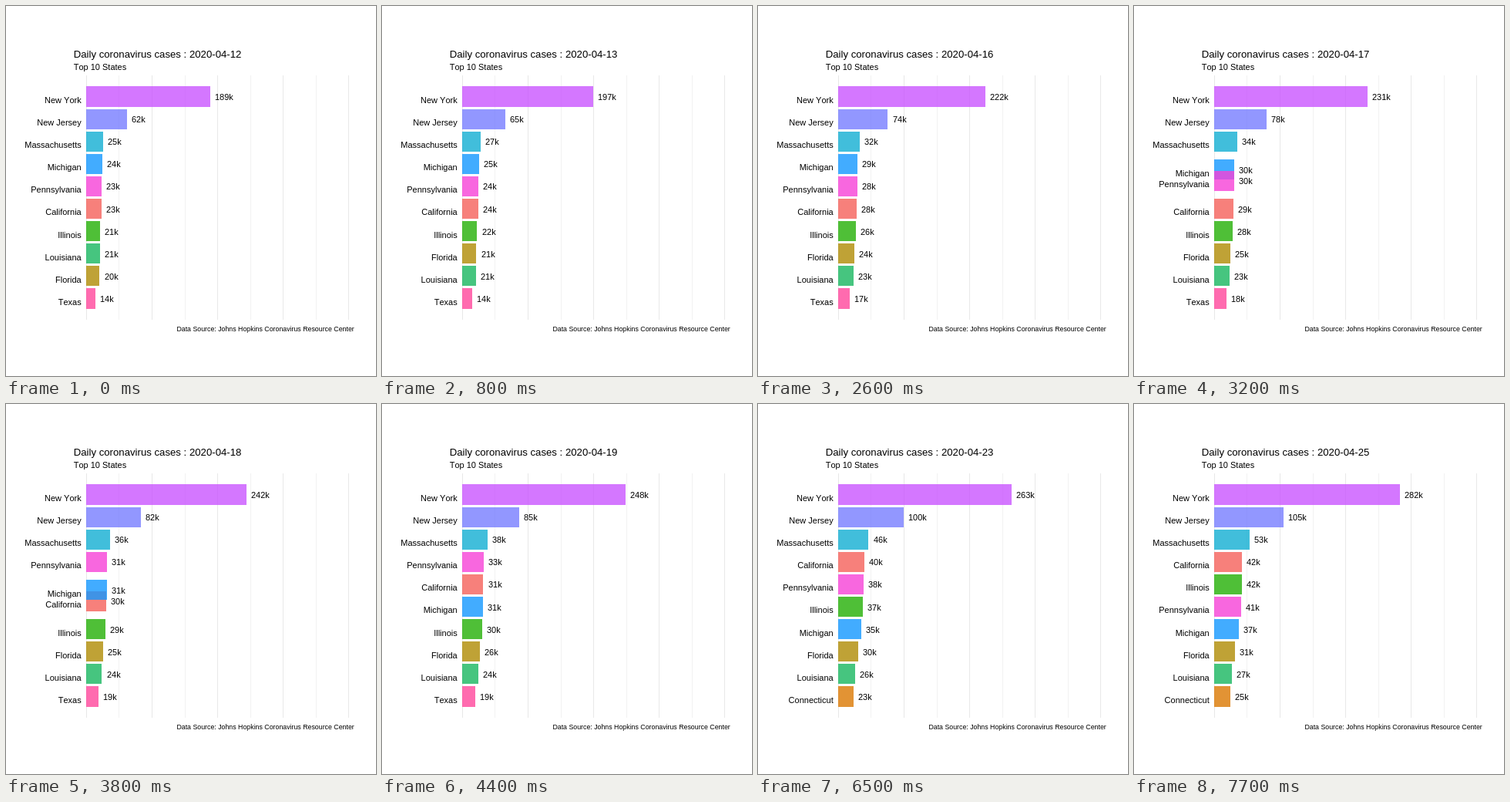
These frames come from a looping animation (480x480 px, 8 s). An HTML page with a canvas:

```html
<!DOCTYPE html>
<html lang="en">
<head>
<meta charset="utf-8">
<title>Daily coronavirus cases</title>
<style>
  html, body { margin: 0; width: 100%; height: 100%; overflow: hidden; background: #fff; }
  canvas { display: block; width: 480px; height: 480px; }
</style>
</head>
<body>
<canvas id="stage" width="480" height="480"></canvas>
<script>
const ctx = document.getElementById('stage').getContext('2d');
const LOOP = 8000, HOLD = 200, DAY = 600, STEP = 100;
const X0 = 104.3, SCALE = 0.8515;                // px per thousand cases
const TOP = 104.42, PITCH = 29.1, BAR = 26.2;
const FIRST_DATE = 12, ROWS = 10;

// Turning points as day: thousands of cases; growth is linear in between.
const states = [
  { name: 'California', color: '#f6615a', keys: { 0: 22.85, 7: 31.43, 11: 39.56, 13: 42.37 } },
  { name: 'Connecticut', color: '#db7902', keys: { 0: 12, 8: 20.15, 9: 20.3, 10: 22.4, 13: 24.6 } },
  { name: 'Florida', color: '#b08b04', keys: { 0: 20.16, 7: 26.31, 11: 29.65, 13: 30.84 } },
  { name: 'Illinois', color: '#24af06', keys: { 0: 20.85, 7: 30.2, 11: 36.65, 13: 41.78 } },
  { name: 'Louisiana', color: '#18b75f', keys: { 0: 20.51, 5: 23.12, 13: 26.51 } },
  { name: 'Massachusetts', color: '#12aed2', keys: { 0: 25, 9: 41.2, 11: 46.02, 13: 53.35 } },
  { name: 'Michigan', color: '#1398ff', keys: { 0: 24.24, 5: 30.02, 7: 31.42, 13: 37.2 } },
  { name: 'New Jersey', color: '#777eff', keys: { 0: 61.85, 3: 70.9, 11: 99.6, 13: 105.4 } },
  { name: 'New York', color: '#ca56ff', keys: { 0: 189, 5: 230.6, 6: 242.15, 9: 258.36, 10: 263.75, 11: 263.46, 13: 282.14 } },
  { name: 'Pennsylvania', color: '#f741d7', keys: { 0: 22.94, 5: 29.8, 13: 41.15 } },
  { name: 'Texas', color: '#ff469c', keys: { 0: 13.68, 13: 24.14 } }
];

const mix = (a, b, p) => a + (b - a) * p;

function casesOn({ keys }, day) {
  const days = Object.keys(keys).map(Number);
  const i = Math.max(1, days.findIndex(d => d >= day));
  const a = days[i - 1], b = days[i];
  return mix(keys[a], keys[b], (day - a) / (b - a));
}

function rankOn(state, day) {
  const own = casesOn(state, day);
  return states.filter(s => casesOn(s, day) > own).length;
}

// Newcomers replace the dropouts only when the step to the next day is complete.
function barsAt(day, p) {
  return states.map(s => {
    const r0 = rankOn(s, day), v0 = casesOn(s, day);
    const hold = { s, rank: r0, row: r0, value: v0, shown: v0 };
    if (p === 0) return hold;
    const r1 = rankOn(s, day + 1), v1 = casesOn(s, day + 1);
    if (p === 1) return { s, rank: r1, row: r1, value: v1, shown: v1 };
    if (r1 >= ROWS) return hold;
    return { s, rank: r0, row: mix(r0, r1, p), value: mix(v0, v1, p), shown: p < 0.5 ? v0 : v1 };
  }).filter(b => b.rank < ROWS);
}

function text(str, x, y, size, align = 'left') {
  ctx.font = `${size}px "Liberation Sans", Arial, sans-serif`;
  ctx.textAlign = align;
  ctx.fillText(str, x, y);
}

function drawGrid() {
  for (let i = 0; i <= 8; i++) {
    ctx.fillStyle = i % 2 ? '#f2f2f2' : '#e8e8e8';
    ctx.fillRect(Math.floor(X0 + i * 50 * SCALE), 90, 1, 317);
  }
}

function draw(time) {
  const u = time % LOOP - HOLD;
  const day = Math.max(0, Math.floor(u / DAY));
  const p = u < 0 ? 0 : Math.min(4, Math.floor(u % DAY / STEP) + 1) / 4;
  const bars = barsAt(day, p);

  ctx.fillStyle = '#fff';
  ctx.fillRect(0, 0, 480, 480);
  drawGrid();

  ctx.globalAlpha = 0.8;
  for (const { s, row, value } of bars) {
    const y = TOP + row * PITCH, top = Math.round(y);
    ctx.fillStyle = s.color;
    ctx.fillRect(104, top, Math.round(X0 + value * SCALE) - 104, Math.round(y + BAR) - top);
  }
  ctx.globalAlpha = 1;

  ctx.fillStyle = '#000';
  for (const { s, row, value, shown } of bars) {
    const mid = TOP + row * PITCH + BAR / 2;
    text(s.name, 97.7, Math.round(mid + 8.42), 11, 'right');
    text(Math.round(shown) + 'k', Math.round(X0 + value * SCALE + 6.1), Math.round(mid + 4.5), 11);
  }

  const date = FIRST_DATE + day + (p >= 0.5 ? 1 : 0);
  text(`Daily coronavirus cases : 2020-04-${date}`, 87.7, 67, 13.2);
  text('Top 10 States', 87.7, 83, 11);
  text('Data Source: Johns Hopkins Coronavirus Resource Center', 451.7, 422, 8.8, 'right');
}

ctx.fontKerning = 'none';
const start = performance.now();
function tick() {
  draw(performance.now() - start);
  requestAnimationFrame(tick);
}
tick();
</script>
</body>
</html>
```
